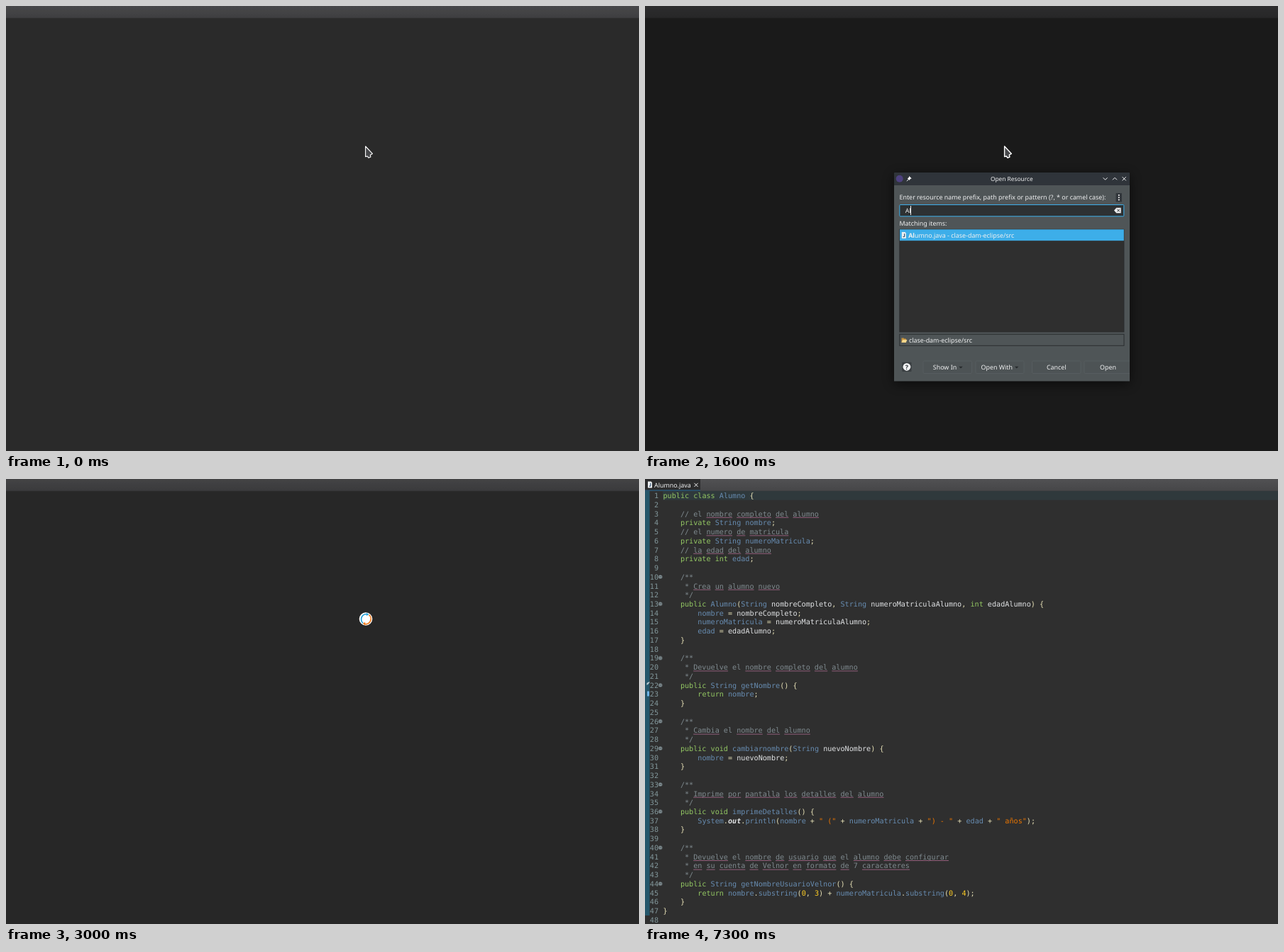
Recreate the animation shown at these times as an HTML page. Size 892x628 px, loop 8000 ms.

```html
<!DOCTYPE html>
<html lang="es">
<head>
<meta charset="utf-8">
<title>Open Resource</title>
<style>
html, body { margin: 0; width: 100%; height: 100%; overflow: hidden; background: #2f2f2f; }
svg { display: block; width: 892px; height: 628px; }
text { white-space: pre; text-rendering: geometricPrecision; }
.ui { font: 8.9px "Noto Sans", "Open Sans", sans-serif; fill: #eff0f1; }
.code { font: 10.13px "DejaVu Sans Mono", "Noto Sans Mono", monospace; }
.soft { fill: #868686; }
.mid { text-anchor: middle; }
.line { fill: none; stroke: #eff0f1; }

/* code colours */
.num { fill: #81969a; text-anchor: end; }
.key { fill: #93c763; }
.cmt { fill: #7f8a8f; }
.str { fill: #ec7600; }
.dig { fill: #ffcd22; }
.op { fill: #e8e2b7; }
.var { fill: #e0e2e4; }
.out { fill: #e0e2e4; font-weight: bold; font-style: italic; }

.anim, .sem { animation: 8s step-end infinite; }
.sem { fill: #678cb1; animation-name: sem; }
#dim { animation-name: dim; }
#dialog { animation-name: dialog; transform-origin: 517px 382px; }
#caret { animation-name: caret; }
#arrow { animation-name: arrow; }
#busy { animation-name: busy; }
#beam { animation-name: beam; }
#editor { animation-name: editor; }
#cursorBar { animation-name: cursorBar; }
.late { animation-name: late; }
#tabLine { animation-name: active; }
#typed0 { animation-name: typed0; }
#typed1 { animation-name: typed1; }
#typed2 { animation-name: typed2; }
#typed3 { animation-name: typed3; }
#typed4 { animation-name: typed4; }

@keyframes dim {
  0% { opacity: .11 } 6.25% { opacity: .28 } 7.5% { opacity: .45 }
  35% { opacity: .17 } 40% { opacity: .08 } 85%, 100% { opacity: 0 }
}
@keyframes dialog {
  0% { opacity: 0 } 6.25% { opacity: .5 } 7.5% { opacity: 1; transform: none }
  35% { opacity: .1; transform: translateY(-88px) scaleY(.68) }
  37.5%, 100% { opacity: 0 }
}
@keyframes caret {
  0% { opacity: 1; transform: none } 15% { opacity: 0; transform: none }
  16.25% { opacity: 1; transform: none } 20% { opacity: 1; transform: translateX(7px) }
  22.5% { opacity: 1; transform: translateX(13px) } 23.75% { opacity: 1; transform: translateX(21px) }
  25% { opacity: 1; transform: translateX(27px) } 30%, 100% { opacity: 0 }
}
@keyframes arrow {
  0% { opacity: 1; stroke-width: 1.1px } 7.5% { opacity: 1; stroke-width: 1.4px }
  35% { opacity: 1; stroke-width: 1.1px } 37.5%, 100% { opacity: 0 }
}
@keyframes busy { 0% { opacity: 0 } 37.5% { opacity: 1 } 40%, 100% { opacity: 0 } }
@keyframes beam { 0% { opacity: 0 } 40% { opacity: 1 } 80%, 100% { opacity: 0 } }
@keyframes editor { 0% { opacity: 0 } 40%, 100% { opacity: 1 } }
@keyframes late { 0% { opacity: 0 } 43.75%, 100% { opacity: 1 } }
@keyframes active { 0% { opacity: 0 } 85%, 100% { opacity: 1 } }
@keyframes cursorBar { 0% { opacity: 0 } 85% { opacity: 1 } 91.25%, 100% { opacity: 0 } }
@keyframes sem { 0% { fill: #e0e2e4 } 43.75%, 100% { fill: #678cb1 } }
@keyframes typed0 { 0% { opacity: 1 } 20%, 100% { opacity: 0 } }
@keyframes typed1 { 0% { opacity: 0 } 20% { opacity: 1 } 22.5%, 100% { opacity: 0 } }
@keyframes typed2 { 0% { opacity: 0 } 22.5% { opacity: 1 } 23.75%, 100% { opacity: 0 } }
@keyframes typed3 { 0% { opacity: 0 } 23.75% { opacity: 1 } 25%, 100% { opacity: 0 } }
@keyframes typed4 { 0% { opacity: 0 } 25%, 100% { opacity: 1 } }
</style>
</head>
<body>
<svg viewBox="0 0 892 628">
  <defs>
    <linearGradient id="bar" x2="0" y2="1"><stop stop-color="#515153"/><stop offset="1" stop-color="#464648"/></linearGradient>
    <filter id="shadow" x="-20%" y="-20%" width="140%" height="140%"><feGaussianBlur stdDeviation="8"/></filter>
    <g id="file">
      <path d="M-3 -4.5H1.5L3 -3V4.5H-3Z" fill="#eceff1"/>
      <path d="M.8 -2.2V1.2Q.8 2.6 -1.2 2" fill="none" stroke="#3b5878" stroke-width="1.2"/>
    </g>
    <g id="fold"><circle r="2.6" fill="#87979c"/><path d="M-1.4 0H1.4" stroke="#2f2f2f" stroke-width=".8"/></g>
    <path id="cross" d="M-2.6 -2.6L2.6 2.6M2.6 -2.6L-2.6 2.6"/>
  </defs>

  <rect width="892" height="628" fill="#2f2f2f"/>
  <rect width="892" height="17" fill="url(#bar)"/>
  <path d="M0 17H892" stroke="#3a3a3b" stroke-width=".8"/>

  <g id="editor" class="anim">
    <rect width="78" height="17" fill="#2c2c2d"/>
    <rect id="tabLine" class="anim" y="15.5" width="78" height="1.2" fill="#2a6288"/>
    <use href="#file" x="7" y="8"/>
    <text class="ui" x="13" y="11.7">Alumno.java</text>
    <use href="#cross" class="line" x="72" y="8.4"/>
    <rect x="25" y="17" width="867" height="12.7" fill="#2f393c"/>
    <rect class="anim late" y="17" width="6.5" height="599" fill="#25566a"/>
    <g id="lines" class="code"></g>
    <g class="anim late">
      <path d="M2.5 291V288L5 286.5H7L4.5 289.5Z" fill="#b9cbd2"/>
      <rect x="3" y="299.5" width="3" height="7" fill="#6db3e6"/>
    </g>
    <rect id="cursorBar" class="anim" x="25" y="17" width="1.5" height="13" fill="#e0e2e4"/>
  </g>

  <rect id="dim" class="anim" width="892" height="628"/>

  <g id="dialog" class="anim">
    <rect x="351" y="239" width="332" height="294" fill="#000" opacity=".6" filter="url(#shadow)"/>
    <path d="M351 529.5V237Q351 235 353 235H681Q683 235 683 237V529.5Z" fill="#4f5557"/>
    <path d="M351 253V237Q351 235 353 235H681Q683 235 683 237V253Z" fill="#2f343a"/>
    <circle cx="358.7" cy="243.7" r="5" fill="#4d417f"/>
    <path d="M372.2 240L375.8 243.4L374.2 243.8L372.4 246L369.9 243.6L372 241.8Z" fill="#fff"/>
    <path d="M371 245L368.8 247.2" class="line"/>
    <text class="ui mid" x="516.8" y="247" style="font-size:8.35px">Open Resource</text>
    <g class="line">
      <path d="M645.6 242.3L648.6 245.3L651.6 242.3M659 245.3L662 242.3L665 245.3"/>
      <use href="#cross" x="675.2" y="243.8"/>
    </g>

    <text class="ui" x="358.5" y="273.4">Enter resource name prefix, path prefix or pattern (?, * or camel case):</text>
    <rect x="663.5" y="264" width="8.5" height="12.5" rx="1" fill="#31363b"/>
    <g fill="#fff"><circle cx="667.8" cy="267" r="1"/><circle cx="667.8" cy="270.3" r="1"/><circle cx="667.8" cy="273.6" r="1"/></g>
    <rect x="358.8" y="280.5" width="316" height="16.3" rx="1" fill="#2d3133" stroke="#3daee9"/>
    <text class="ui" x="358.5" y="309.6">Matching items:</text>
    <rect x="358.8" y="315.2" width="316.2" height="144.8" fill="#2f2f2f" stroke="#292c2d" stroke-width=".8"/>
    <rect x="359" y="315.3" width="315.8" height="15.9" fill="#3daee9"/>
    <use href="#file" x="364.8" y="323.5"/>
    <g id="results"></g>
    <rect id="caret" class="anim" x="367" y="282" width="1" height="13" fill="#eff0f1"/>

    <rect x="358.8" y="463.3" width="316.2" height="16" fill="#4f5557" stroke="#2b2e30"/>
    <path d="M361.5 475V468.5H364.5L365.5 469.5H368V475Z" fill="#c8933c"/>
    <path d="M361.5 475L363 471H369.3L367.8 475Z" fill="#f6d78b"/>
    <text class="ui" x="372" y="475.1">clase-dam-eclipse/src</text>

    <rect x="362.3" y="502.7" width="13.2" height="13.2" rx="1" fill="#393e41"/>
    <circle cx="368.9" cy="509.3" r="5.4" fill="#f3f4f5"/>
    <text class="ui mid" x="368.9" y="512.7" style="fill:#31363b;font-weight:bold">?</text>
    <g fill="#4d5355" stroke="#5a6063" stroke-width=".8">
      <rect x="392" y="501" width="68.5" height="17.5" rx="1.5"/>
      <rect x="466" y="501" width="68" height="17.5" rx="1.5"/>
      <rect x="545.5" y="501" width="68.5" height="17.5" rx="1.5"/>
      <path d="M683 501H620.5Q619 501 619 502.5V517Q619 518.5 620.5 518.5H683"/>
    </g>
    <path d="M442.3 508.8H447.7L445 511.5ZM521 508.8H526.4L523.7 511.5Z" fill="#25292b"/>
    <g class="ui">
      <text x="405.8" y="513.3">Show In</text><text x="473.6" y="513.3">Open With</text>
      <text x="566" y="513.3">Cancel</text><text x="641" y="513.3">Open</text>
    </g>
  </g>

  <path id="arrow" class="anim" d="M506.6 198L516.4 208.4L513.3 210.2L513.9 213L511 214.3L509.3 212L506.6 212.6Z" fill="#46474a" stroke="#fff" stroke-linejoin="round"/>
  <g id="busy" class="anim" fill="none" stroke-width="1.7">
    <circle cx="507" cy="197.5" r="9.3" fill="#fff"/>
    <path d="M503.5 203.9A7.4 7.4 0 0 1 510.4 191" stroke="#2ba3d9"/>
    <path d="M511.5 191.7A7.4 7.4 0 0 1 504.4 204.4" stroke="#ee7a1c"/>
    <path d="M508.5 188.8L511.2 191.8L507.6 193Z" fill="#2ba3d9"/>
    <path d="M505.5 206.2L502.8 203.4L506.4 202Z" fill="#ee7a1c"/>
  </g>
  <g id="beam" class="anim" fill="none">
    <path id="ibeam" d="M504.7 191.2Q507.2 191.2 507.4 192.8Q507.6 191.2 510 191.2M507.4 192.5V203.5M504.7 204.8Q507.2 204.8 507.4 203.2Q507.6 204.8 510 204.8" stroke="#1c1c1c" stroke-width="2.6"/>
    <use href="#ibeam" style="stroke:#fff"/>
    <path d="M504.7 191.2Q507.2 191.2 507.4 192.8Q507.6 191.2 510 191.2M507.4 192.5V203.5M504.7 204.8Q507.2 204.8 507.4 203.2Q507.6 204.8 510 204.8" stroke="#fff" stroke-width="1.3"/>
  </g>
</svg>

<script>
const source = `public class Alumno {

    // el nombre completo del alumno
    private String nombre;
    // el numero de matricula
    private String numeroMatricula;
    // la edad del alumno
    private int edad;

    /**
     * Crea un alumno nuevo
     */
    public Alumno(String nombreCompleto, String numeroMatriculaAlumno, int edadAlumno) {
        nombre = nombreCompleto;
        numeroMatricula = numeroMatriculaAlumno;
        edad = edadAlumno;
    }

    /**
     * Devuelve el nombre completo del alumno
     */
    public String getNombre() {
        return nombre;
    }

    /**
     * Cambia el nombre del alumno
     */
    public void cambiarnombre(String nuevoNombre) {
        nombre = nuevoNombre;
    }

    /**
     * Imprime por pantalla los detalles del alumno
     */
    public void imprimeDetalles() {
        System.out.println(nombre + " (" + numeroMatricula + ") - " + edad + " años");
    }

    /**
     * Devuelve el nombre de usuario que el alumno debe configurar
     * en su cuenta de Velnor en formato de 7 caracateres
     */
    public String getNombreUsuarioVelnor() {
        return nombre.substring(0, 3) + numeroMatricula.substring(0, 4);
    }
}
`;
const LEFT = 25.5, CHAR = 6.098, PITCH = 12.74;
const keywords = /^(public|class|private|int|void|return)$/;
const params = /^(nombreCompleto|numeroMatriculaAlumno|edadAlumno|nuevoNombre)$/;
const folded = [10, 13, 19, 22, 26, 29, 33, 36, 40, 44];

const span = (cls, s) => `<tspan class="${cls}">${s}</tspan>`;

function kind(token) {
  if (token[0] === '"') return 'str';
  if (/^\d/.test(token)) return 'dig';
  if (!/^\w/.test(token)) return 'op';
  if (keywords.test(token)) return 'key';
  if (token === 'out') return 'out';
  return params.test(token) ? 'var' : 'sem';
}

function drawLine(line, i) {
  const y = 27.1 + i * PITCH;
  const comment = /^\s*(\/|\*)/.test(line);
  const body = comment ? span('cmt', line)
    : line.replace(/"[^"]*"|\w+|[^\s\w"]+/g, t => span(kind(t), t));
  let out = `<text class="num" x="19" y="${y}">${i + 1}</text><text x="${LEFT}" y="${y}">${body}</text>`;
  if (comment) {
    // spell-check marks
    for (const m of line.matchAll(/[a-z]+/gi)) {
      if (m[0] === 'el') continue;
      out += `<path class="anim late" d="M${LEFT + m.index * CHAR} ${y + 1.8}h${m[0].length * CHAR}" stroke="#925f7b"/>`;
    }
  }
  if (folded.includes(i + 1)) out += `<use class="anim late" href="#fold" x="21.6" y="${y - 3.8}"/>`;
  return out;
}
document.getElementById('lines').innerHTML = source.split('\n').map(drawLine).join('');

const path = ' - clase-dam-eclipse/src';
const row = (n, html) => `<text class="ui" x="371.2" y="${326.7 + n * 16.1}">${html}</text>`;
const fileIcon = n => `<use href="#file" x="364.8" y="${323.5 + n * 16.1}"/>`;
const clear = `<path d="M661 288.5L664.3 284.8H670.7V292.2H664.3Z" fill="#eff0f1"/>
  <path d="M665.3 286.6L669 290.4M669 286.6L665.3 290.4" stroke="#2d3133"/>`;

let results = `<g id="typed0" class="anim">${row(0, 'Alumno.java' + path)}`;
['App.java', 'ClaseDam.java'].forEach((name, i) => {
  results += fileIcon(i + 1) + row(i + 1, name + span('soft', path));
});
results += '</g>';
['Al', 'Alu', 'Alum', 'Alumn'].forEach((typed, i) => {
  const rest = 'Alumno.java'.slice(typed.length);
  results += `<g id="typed${i + 1}" class="anim"><text class="ui" x="366.7" y="291.7">${typed}</text>${clear}
    ${row(0, `<tspan font-weight="bold">${typed}</tspan>${rest}${path}`)}</g>`;
});
document.getElementById('results').innerHTML = results;
</script>
</body>
</html>
```
